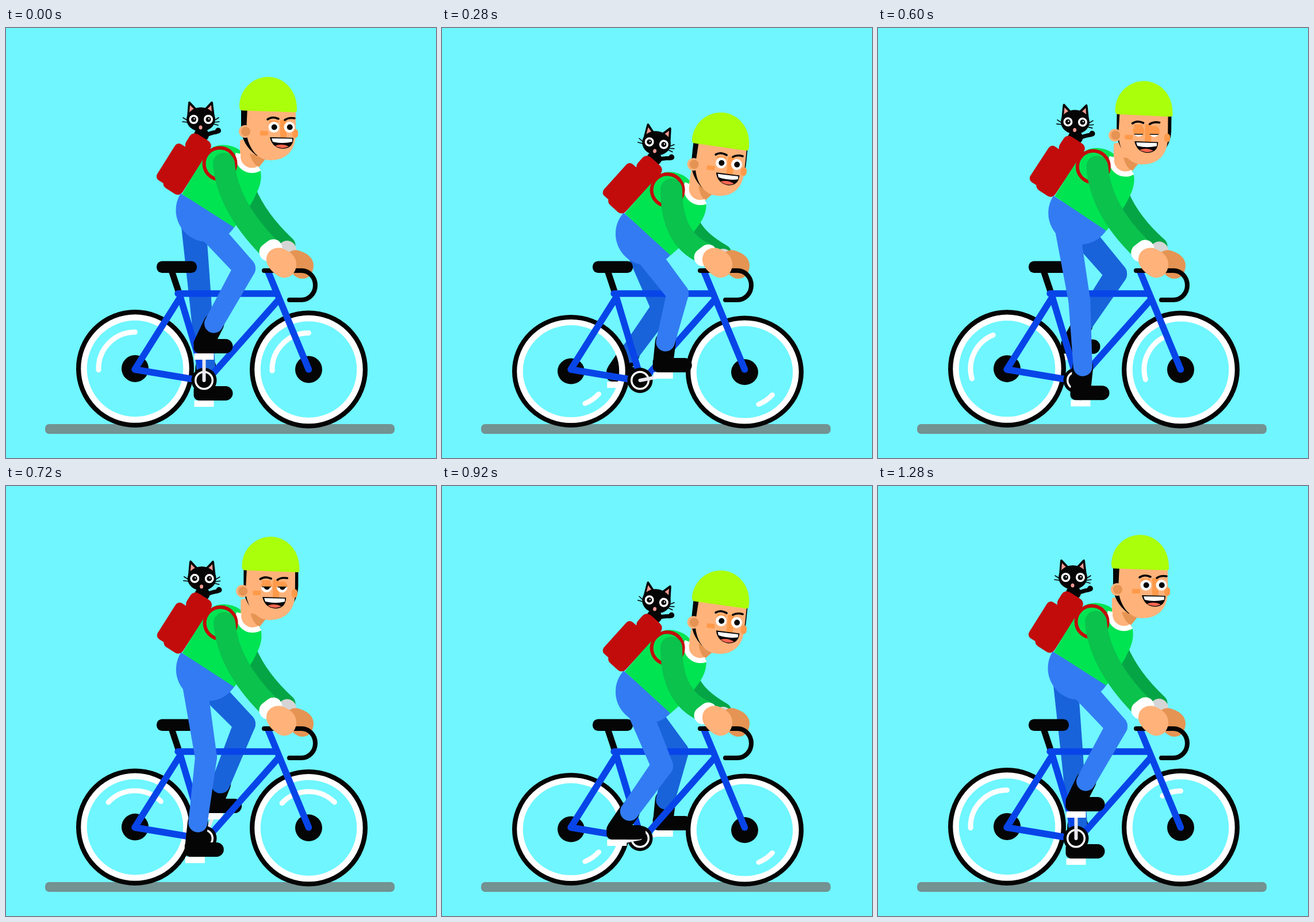
Recreate the animation shown at these times as an HTML page with a canvas. Size 748x748 px, loop 1.32 s.

```html
<!DOCTYPE html>
<html>
<head>
<meta charset="utf-8">
<style>
html, body { margin: 0; height: 100%; overflow: hidden; background: #6ff6ff; }
canvas { display: block; }
</style>
</head>
<body>
<canvas id="stage" width="748" height="748"></canvas>
<script>
const ctx = document.getElementById('stage').getContext('2d');
const TAU = Math.PI * 2, RAD = Math.PI / 180;
const STEP = 40, LOOP = 1320, TURN = 32;
const BLACK = '#050505', WHITE = '#fff', BLUE = '#0845e8', RED = '#c20c0c';
const SKIN = '#ffb27a', SHADE = '#e59453', ORANGE = '#ff9a4a', JEANS = '#337bf2';
const CRANK = { x: 344.5, y: 613, r: 41 };

// step, knee x, knee y, ankle offset from the pedal
const LEG = [
  [0, 415, 418, 17, -58], [2, 415, 414, 13, -57], [7, 410, 462, 4, -59], [12, 397, 480, 7, -64],
  [16, 338, 472, 3, -64], [18, 348, 472, 5, -65], [23, 383, 487, 22, -55], [28, 409, 461, 25, -52]
];
// step, how far the face has turned towards the viewer
const FACE = [[0, 0], [7, 5.5], [12, 18], [18, 18], [23, 5.5], [28, 2]];

// Smooth periodic curve through the keys
function sample(keys, step, col) {
  const n = keys.length, p = step % TURN;
  const key = i => {
    const k = keys[(i + n) % n];
    return [k[0] + TURN * Math.floor(i / n), k[col]];
  };
  let i = n - 1;
  while (keys[i][0] > p) i--;
  const [a, b, c, d] = [key(i - 1), key(i), key(i + 1), key(i + 2)];
  const span = c[0] - b[0], u = (p - b[0]) / span;
  const m0 = (c[1] - a[1]) / (c[0] - a[0]) * span;
  const m1 = (d[1] - b[1]) / (d[0] - b[0]) * span;
  const u2 = u * u, u3 = u2 * u;
  return (2 * u3 - 3 * u2 + 1) * b[1] + (u3 - 2 * u2 + u) * m0 +
    (3 * u2 - 2 * u3) * c[1] + (u3 - u2) * m1;
}

function fill(color, d) {
  ctx.fillStyle = color;
  ctx.fill(new Path2D(d));
}
function line(color, width, d, cap = 'round') {
  ctx.strokeStyle = color;
  ctx.lineWidth = width;
  ctx.lineCap = cap;
  ctx.lineJoin = 'round';
  ctx.stroke(new Path2D(d));
}
function oval(color, x, y, rx, ry = rx) {
  ctx.fillStyle = color;
  ctx.beginPath();
  ctx.ellipse(x, y, rx, ry, 0, 0, TAU);
  ctx.fill();
}
function arc(color, width, x, y, r, from = 0, to = TAU) {
  ctx.strokeStyle = color;
  ctx.lineWidth = width;
  ctx.lineCap = 'round';
  ctx.beginPath();
  ctx.arc(x, y, r, from, to);
  ctx.stroke();
}
function box(color, x, y, w, h, r = 0) {
  ctx.fillStyle = color;
  ctx.beginPath();
  ctx.roundRect(x, y, w, h, r);
  ctx.fill();
}
function group(draw, px, py, dx, dy, angle, sy = 1) {
  ctx.save();
  ctx.translate(px + dx, py + dy);
  ctx.rotate(angle * RAD);
  ctx.scale(1, sy);
  ctx.translate(-px, -py);
  draw();
  ctx.restore();
}
// Tapered capsule
function limb(color, x1, y1, r1, x2, y2, r2) {
  const a = Math.atan2(y2 - y1, x2 - x1) + Math.PI / 2;
  ctx.fillStyle = color;
  ctx.beginPath();
  ctx.arc(x1, y1, r1, a, a + Math.PI);
  ctx.arc(x2, y2, r2, a + Math.PI, a + TAU);
  ctx.fill();
}

function leg(color, step, bob) {
  const a = step / TURN * TAU;
  const px = CRANK.x + CRANK.r * Math.sin(a), py = CRANK.y - CRANK.r * Math.cos(a);
  const [kx, ky, ox, oy] = [1, 2, 3, 4].map(c => sample(LEG, step, c));
  const ax = px + ox, ay = py + oy;
  line('#e8e8ee', 6, `M${CRANK.x} ${CRANK.y}L${px} ${py}`);
  box(WHITE, px - 17, py - 6, 34, 11);
  limb(BLACK, ax, ay, 18, px, py - 23.5, 17.5);
  box(BLACK, px - 18, py - 31, 68, 25, [6, 12.5, 12.5, 9]);
  limb(color, 324 + 6 * bob, 318 + 40 * bob, 22, kx, ky, 19);
  limb(color, kx, ky, 19, ax, ay, 16.5);
}

function wheel(x, y, step, squash, maxArc) {
  const head = 270 + 22.5 * step;
  const length = Math.min(maxArc, 55 + 40 * Math.cos((step - 1) * 22.5 * RAD));
  group(() => {
    arc(BLACK, 9, x, y, 98);
    arc(WHITE, 10.5, x, y, 89);
    oval(BLACK, x, y, 23.5);
    arc(WHITE, 9, x, y, 63.5, (head - length) * RAD, head * RAD);
  }, x, y + 102.5, 0, 0, 0, 1 - .046 * squash);
}

function bike(step) {
  const squash = (1 - Math.cos(step * 22.5 * RAD)) / 2;
  wheel(224.5, 592.5, step, squash, 360);
  wheel(526.5, 594, step, squash, step > 26 ? 30 : 360);
  line(BLACK, 11, 'M288 422L300 458', 'butt');
  box(BLACK, 262, 405.5, 70, 20.5, 9.5);
  line(BLUE, 11.5, 'M299 462H472M302 470L224 594L332 612M302 464L344 604M474 473L356 606M456 424L526.5 594');
  line(BLACK, 8, 'M449 422H514A24 25.5 0 0 1 514 473H493');
  oval(BLACK, CRANK.x, CRANK.y, 22);
  arc(WHITE, 3.5, CRANK.x, CRANK.y, 14.8);
}

function cat() {
  line(BLACK, 7, 'M344 188Q357 182 366 181');
  oval(BLACK, 369, 178.5, 5);
  oval(BLACK, 340, 186, 13, 12);
  fill(BLACK, 'M315 155L317 130Q318 126 321 129L335 144ZM363 155L360 130Q359 126 356 129L342 144Z');
  fill('#f59b94', 'M319 147L320 134L329 143ZM358 147L357 134L348 143Z');
  oval(BLACK, 339, 159, 25, 21);
  for (const x of [326.5, 352]) {
    oval(WHITE, x, 159, 8);
    oval(BLACK, x, 159, 4.5);
    oval(WHITE, x + 1, 158, 1.2);
  }
  oval('#f59b94', 338.5, 173, 3, 3.5);
  line(BLACK, 1.6, 'M362 161L370 156M362 164L371 163M361 167L369 169M316 161L308 156M316 164L307 163');
}

function torso() {
  fill('#00e452', 'M306 289L348 217Q362 201 385 204Q402 206 412 218L441 243Q448 261 437 285Q424 315 397 347Z');
  cat();
  group(() => {
    box(RED, 296, 183, 38, 109, 10);
    box(RED, 293, 183, 42, 32, 10);
    box(RED, 280, 213, 25, 74, 8);
  }, 315, 237, 0, 0, 32);
  fill(SKIN, 'M407 195V220A22 22 0 0 0 440 242L456 222L430 190Z');
  fill(SHADE, 'M424 219L456 222L440 242Q430 238 424 219Z');
  line(WHITE, 9, 'M404 218A24.5 24.5 0 0 0 441 244', 'butt');
  arc(RED, 6, 372, 236, 27.5);
}

function head(turn, lid) {
  const shift = (amount, draw) => group(draw, 0, 0, -turn * amount, 0, 0);
  fill(BLACK, 'M409 138H504V172Q503 206 470 222H436Q409 202 409 172Z');
  shift(.3, () => {
    fill(SKIN, 'M420 138H504V184C504 213 487 230 460 230C434 230 420 204 418 180Z');
    box(ORANGE, 498, 176, 10, 15, 5);
  });
  shift(.5, () => {
    oval(SKIN, 416, 180, 11);
    oval(SHADE, 417, 180, 8);
  });
  shift(.95, () => {
    box(ORANGE, 442, 179, 14, 8, 2);
    box(ORANGE, 458, 161, 15, 9);
    box(ORANGE, 477, 160, 11, 33, 2);
    for (const x of [466, 493]) {
      oval(WHITE, x, 172.5, 9.5);
      oval(BLACK, x + .7, 172.5, 5);
      if (lid > 0) {
        ctx.save();
        ctx.beginPath();
        ctx.rect(x - 11, 162, 22, 21 * lid);
        ctx.clip();
        oval(ORANGE, x, 172.5, 10);
        ctx.restore();
        line(BLACK, 1.5, `M${x - 7} ${162 + 21 * lid}h14`);
      }
    }
    line(BLACK, 3.6, 'M455 159Q463 153 474 158M485 160Q492 155 502 157');
    fill(BLACK, 'M459 190L500 191Q500 209 482 210Q463 209 459 190Z');
    fill(WHITE, 'M462 192L498 192.5V198Q480 202 464 198Z');
    fill('#ff6650', 'M468 205Q480 200 492 206Q482 212 468 205Z');
  });
  fill('#aaff0a', 'M406 137C406 106 430 85 456 85S506 107 506 140V144Q505 147 500 146.5L411 143.5Q406 143 406 137Z');
}

function draw(step) {
  const phi = step * 22.5 * RAD;
  const bob = .553 * (1 - Math.cos(phi)) - .18 * Math.sin(phi) + .016 * (1 - Math.cos(2 * phi));
  const turn = sample(FACE, step, 1);
  const lid = Math.max(0, 1 - Math.abs(step - 16) / 4);

  box('#6ff6ff', 0, 0, 748, 748);
  box('#739292', 68, 689, 608, 17, 7);

  leg('#1863da', step + TURN / 2, bob);
  const farWrist = 378 + 14 * bob;
  line('#05a546', 31, `M${420 + 12 * bob} ${285 + 53 * bob}Q${440 + 4 * bob} ${333 + 34 * bob} 488 ${farWrist}`);
  oval('#d5d5d5', 489, farWrist + 8, 16);
  fill(SHADE, 'M486 396Q498 382 512 388Q535 396 535 414Q533 437 513 436Q492 432 486 396Z');

  bike(step);

  leg(JEANS, step, bob);
  group(() => {
    ctx.fillStyle = JEANS;
    ctx.beginPath();
    ctx.arc(350.5, 317, 55, 32 * RAD, 212 * RAD);
    ctx.fill();
    torso();
  }, 345, 317, 6.5 * bob, 40 * bob, 10 * bob);
  group(() => head(turn, lid), 456, 115, 30 * bob + .17 * turn, 62 * bob, 6 * bob);

  const wristX = 458 - 2 * bob, wristY = 387 + 9 * bob;
  line('#0ac24c', 38, `M${379 + 20 * bob} ${236 + 45 * bob}Q${385 + 14 * bob} ${308 + 58 * bob} ${wristX - 1} ${wristY - 5}`);
  line(WHITE, 31, `M${wristX - 2} ${wristY + 3}l9 -7`);
  fill(SKIN, 'M453 402C454 384 472 380 482 384C498 390 506 400 505 414C503 430 490 438 477 433C466 428 452 414 453 402Z');
}

function tick() {
  draw(Math.floor(performance.now() % LOOP / STEP));
  requestAnimationFrame(tick);
}
tick();
</script>
</body>
</html>
```
